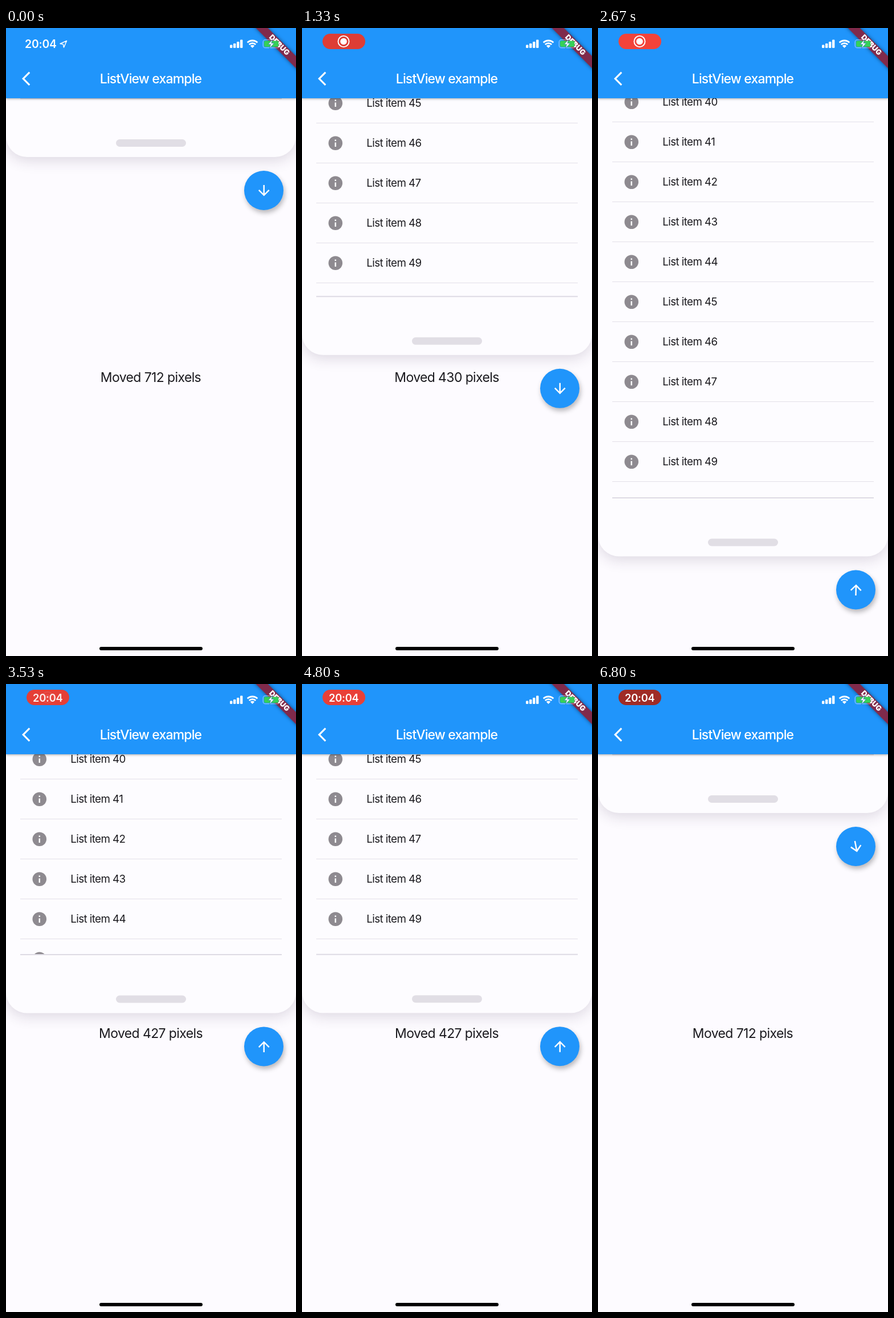
Animation of 509x1100 px, one loop 6830 ms. Source, as an HTML page:

```html
<!DOCTYPE html>
<html lang="en">
<head>
<meta charset="utf-8">
<title>ListView example</title>
<style>
  html, body { margin: 0; width: 100%; height: 100%; overflow: hidden; }
  body { position: relative; background: #fdfbff; color: #1b1a1f; font-family: Inter, "Open Sans", sans-serif; }
  div, svg { position: absolute; }
  #stage { left: 0; top: 0; width: 509px; height: 1100px; overflow: hidden; background: #fdfbff; }
  #moved { left: 0; width: 508px; top: 597px; line-height: 30px; text-align: center; font-size: 23px; letter-spacing: -.62px; }
  #sheet { left: 0; top: -1000px; width: 509px; height: 1000px; background: #fdfcff;
    border-radius: 0 0 37px 37px; box-shadow: 0 6px 25px rgba(50, 30, 70, .16); }
  #clip { left: 0; top: 0; width: 509px; overflow: hidden; }
  .item { left: 25px; width: 459px; height: 70px; box-sizing: border-box; border-bottom: 1.3px solid #e3e0e8; }
  .item span { position: absolute; left: 88.3px; top: 20px; line-height: 30px; font-size: 18.8px; letter-spacing: -.6px; white-space: nowrap; }
  .item svg { left: 19.3px; top: 20.2px; width: 29.5px; height: 29.5px; fill: #8e8a90; }
  #edge { left: 25px; top: -1px; width: 459px; height: 2px; background: #dedbe4; }
  #handle { left: 193px; bottom: 18.5px; width: 123px; height: 12.5px; border-radius: 7px; background: #e1dee5; }
  #fab { left: 418px; top: 24px; width: 69px; height: 69px; border-radius: 50%; background: #2095fb;
    box-shadow: 2px 5px 8px rgba(0, 0, 0, .27); }
  #arrow { left: 19.7px; top: 19.7px; width: 29.5px; height: 29.5px; fill: #fff; }
  #bar { left: 0; top: 0; width: 509px; height: 123px; background: #2095fb; box-shadow: 0 1px 4px rgba(0, 0, 0, .36); color: #fff; }
  #title { left: 0; width: 508px; top: 73.5px; line-height: 30px; text-align: center; font-size: 23px; font-weight: 500; letter-spacing: -.85px; }
  #back { left: 28px; top: 74.2px; width: 29.5px; height: 29.5px; fill: #fff; }
  #banner { left: 409px; top: 34.5px; width: 200px; height: 14.5px; background: rgba(139, 31, 56, .9); color: #fff;
    box-shadow: 0 0 6px rgba(0, 0, 0, .5); text-align: center; font-size: 12.9px; line-height: 14.5px; font-weight: 900;
    transform: rotate(45deg); transform-origin: 100px -34.5px; }
  #status { left: 0; top: 0; color: #fff; }
  .time { font-weight: 600; font-size: 19.4px; line-height: 24px; letter-spacing: -.2px; white-space: nowrap; }
  #clock { left: 33px; top: 16px; }
  #pill { left: 36px; top: 10px; width: 74.5px; height: 27px; border-radius: 13.5px; }
  #pill .time { left: 0; width: 74.5px; top: 1.5px; text-align: center; font-size: 18.3px; }
  #home { left: 164px; top: 1084px; width: 181px; height: 6px; border-radius: 3px; background: #000; }
</style>
</head>
<body>
<div id="stage">
  <div id="moved"></div>
  <div id="sheet"><div id="handle"></div></div>
  <div id="clip"><div id="list"></div></div>
  <div id="tail"><div id="edge"></div></div>
  <div id="fab">
    <svg id="arrow" viewBox="0 0 24 24"><path d="M20 12l-1.41-1.41L13 16.17V4h-2v12.17l-5.58-5.59L4 12l8 8z"/></svg>
  </div>
  <div id="bar">
    <svg id="back" viewBox="0 0 24 24"><path d="M11.67 3.87L9.9 2.1L0 12l9.9 9.9l1.77-1.77L3.54 12z"/></svg>
    <div id="title">ListView example</div>
  </div>
  <div id="banner">DEBUG</div>
  <div id="status">
    <svg width="509" height="44" fill="none" stroke="#fff">
      <g fill="#fff" stroke="none">
        <rect x="393" y="29.5" width="4.4" height="5.5" rx="1.2"/>
        <rect x="399" y="27" width="4.4" height="8" rx="1.2"/>
        <rect x="405" y="24" width="4.4" height="11" rx="1.2"/>
        <rect x="411" y="20.5" width="4.4" height="14.5" rx="1.2"/>
        <path d="M432.5 35l-3.6-3.7a5.2 5.2 0 0 1 7.2 0z"/>
      </g>
      <path d="M426.8 28.9a8.2 8.2 0 0 1 11.4 0M423.7 25.6a12.6 12.6 0 0 1 17.6 0" stroke-width="2.8"/>
      <rect x="451.2" y="20.7" width="29" height="14" rx="4" stroke-opacity=".5" stroke-width="1.2"/>
      <rect x="453" y="22.5" width="25.4" height="10.4" rx="2.3" fill="#36d058" stroke="none"/>
      <path d="M482 25.5v4.5" stroke-opacity=".5" stroke-width="2"/>
      <path d="M468 20l-8 8.7h4.6L462.3 36l8.4-9.4h-4.8z" fill="#fff" stroke="#2e7fb0" stroke-width=".8"/>
    </svg>
    <div id="clock">
      <div class="time">20:04</div>
      <svg width="90" height="30"><path d="M62 11.5L73.5 6.5L68.5 18L67.3 12.6Z" fill="none" stroke="#fff" stroke-width="1.5" stroke-linejoin="round"/></svg>
    </div>
    <div id="pill">
      <svg id="rec" width="75" height="27"><circle cx="37" cy="13.5" r="9.6" fill="none" stroke="#fff" stroke-width="1.9"/><circle cx="37" cy="13.5" r="5.8" fill="#fff"/></svg>
      <div class="time" id="pillTime">20:04</div>
    </div>
  </div>
  <div id="home"></div>
</div>
<script>
const LOOP = 6830, PITCH = 70, SCALE = 509 / 414;
const $ = id => document.getElementById(id);
const clamp = x => Math.min(1, Math.max(0, x));

const linear = x => x;
const out = x => 1 - (1 - x) ** 3;
const both = x => x * x * (3 - 2 * x);
const settle = x => 1 - (1 - x * x) ** 3;
const elastic = x => x <= 0 ? 0 : x >= 1 ? 1 : 1 + 2 ** (-10 * x) * Math.sin((x - .1) * 5 * Math.PI);

// Each key: time, value, easing from the previous key.
function track(keys, t) {
  const i = keys.findIndex(k => k[0] > t);
  if (i < 0) return keys[keys.length - 1][1];
  if (i === 0) return keys[0][1];
  const [t0, v0] = keys[i - 1], [t1, v1, ease = linear] = keys[i];
  return v0 + (v1 - v0) * ease((t - t0) / (t1 - t0));
}

const bottomKeys = [
  [0, 226], [350, 226], [1330, 572.8, settle], [1370, 572.8], [1450, 576.2, both], [1480, 576.2],
  [2150, 926.2, settle], [2600, 926.2], [2670, 925.5], [2740, 925.5],
  [3530, 576.5, settle], [3570, 576.2], [5600, 576.2], [6400, 226, settle]
];
const scrollKeys = [
  [0, -3365], [350, -3365], [1330, -3018, settle], [1480, -3018],
  [2200, -2674, settle], [2670, -2670, out], [3000, -2668, out], [3800, -2668],
  [4500, -3018, out], [4820, -3018], [5500, -1244, both]
];
const redKeys = [[0, 220], [1330, 222], [2670, 243], [3530, 229], [4800, 233], [5500, 224], [6450, 222], [6800, 160, out]];

for (let n = 0; n < 50; n++) {
  const item = document.createElement('div');
  item.className = 'item';
  item.style.top = n * PITCH - 34.8 + 'px';
  item.innerHTML = '<svg viewBox="0 0 24 24"><path fill-rule="evenodd" d="M12 2a10 10 0 1 0 0 20a10 10 0 1 0 0-20zM11 7h2v2h-2zM11 11h2v6h-2z"/></svg>' +
    `<span>List item ${n}</span>`;
  $('list').append(item);
}

const moveY = (id, y) => $(id).style.transform = `translateY(${y}px)`;

function draw(t) {
  const bottom = track(bottomKeys, t), edge = bottom - 102.5;
  moveY('sheet', bottom);
  moveY('fab', bottom);
  moveY('tail', edge);
  moveY('list', track(scrollKeys, t));
  $('clip').style.height = edge + 'px';
  $('moved').textContent = `Moved ${Math.round(712 - (bottom - 226) / SCALE)} pixels`;

  const turn = elastic((t - 2150) / 1000) + elastic((t - 6400) / 1000);
  $('arrow').style.transform = `rotate(${180 * turn}deg)`;

  const recording = t >= 450, red = track(redKeys, t);
  $('clock').style.visibility = recording ? 'hidden' : 'visible';
  $('pill').style.visibility = recording ? 'visible' : 'hidden';
  $('pill').style.background = `rgb(${red}, ${red * .275}, ${red * .24})`;
  const swap = clamp((t - 3310) / 240);
  $('rec').style.opacity = 1 - swap;
  $('pillTime').style.opacity = swap;
}

function frame() {
  draw(performance.now() % LOOP);
  requestAnimationFrame(frame);
}
frame();
</script>
</body>
</html>
```
